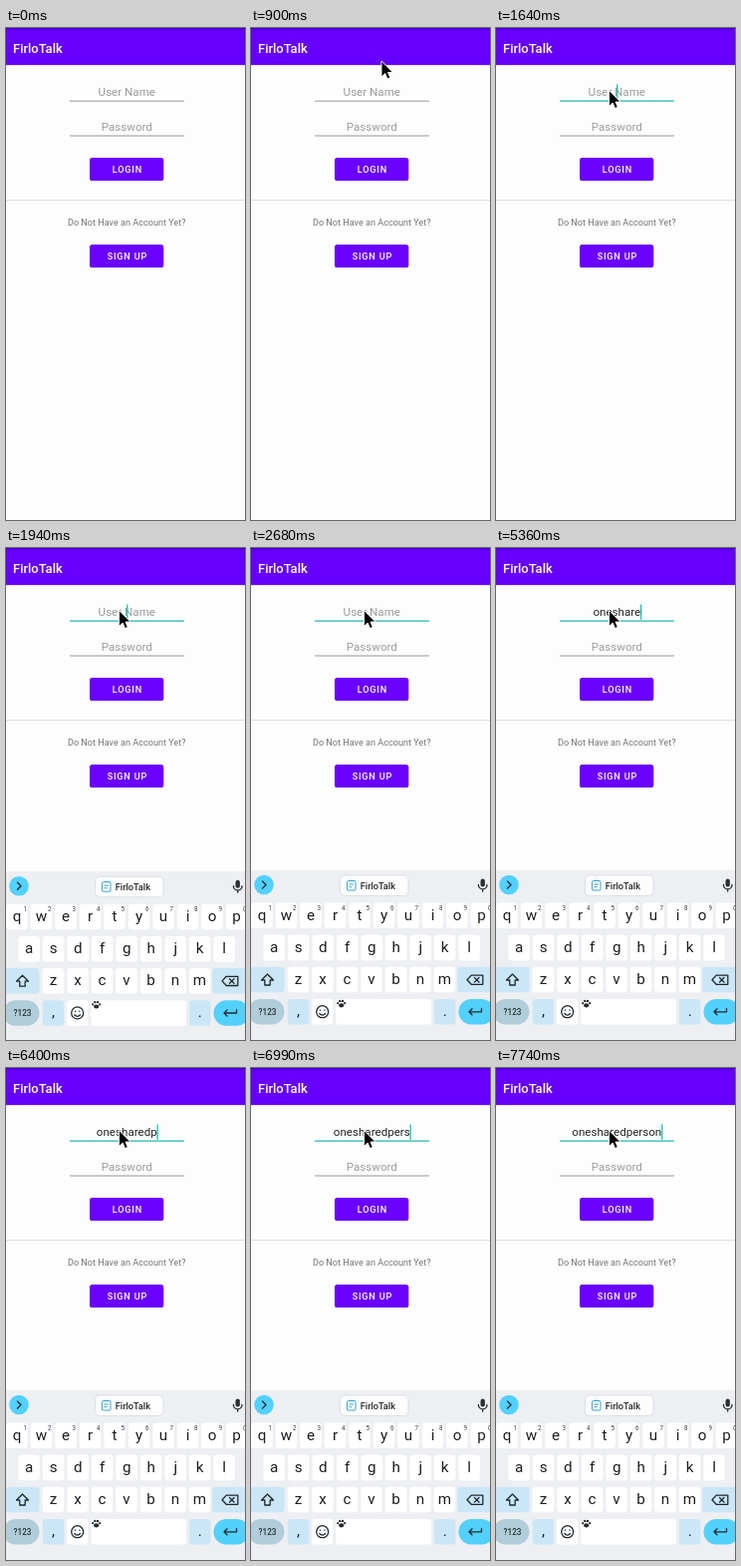
An HTML page for the animation above (8 s loop, 240x493 px).

```html
<!DOCTYPE html>
<html lang="en">
<head>
<meta charset="utf-8">
<title>Login screen</title>
<style>
  html, body { margin: 0; height: 100%; overflow: hidden; background: #fdfdfd; }
  svg { display: block; width: 100vw; height: 100vh; }
  text { font-family: Roboto, sans-serif; }
  .mid { text-anchor: middle; }
  .title { font-size: 13px; font-weight: 500; fill: #fff; }
  .field { font-size: 11.6px; fill: #9b9b9b; }
  .note { font-size: 9.1px; fill: #757575; }
  .button { font-size: 9.1px; font-weight: 500; letter-spacing: .81px; fill: #fff; }
  .chip { font-size: 9.2px; font-weight: 500; fill: #25282b; }
  .key { font-size: 15.2px; fill: #1b1d20; }
  .digit { font-size: 6.3px; fill: #3c4043; }
  .mode { font-size: 8.2px; font-weight: 500; fill: #25323a; }
  .icon { fill: none; stroke: #1f2a30; stroke-width: 1.3; stroke-linecap: round; stroke-linejoin: round; }
</style>
</head>
<body>
<svg viewBox="0 0 240 493" preserveAspectRatio="none">
  <rect width="240" height="493" fill="#fdfdfd"/>
  <rect y="37" width="240" height="1" fill="#000" opacity=".12"/>
  <rect width="240" height="37" fill="#6600fa"/>
  <rect width="240" height="1.5" fill="#4700c8"/>
  <text class="title" x="7" y="24.5">FirloTalk</text>

  <text id="entry" class="field mid" x="121.3" y="68.3"></text>
  <path id="line" d="M64 73.2H179"/>
  <rect id="caret" y="56.5" width="1.3" height="15.3" fill="#14c2b3"/>
  <text class="field mid" x="121.3" y="103.4">Password</text>
  <path d="M64 108H179" stroke="#8c8c8c" stroke-width=".9"/>

  <g fill="#6a00ff">
    <rect x="84" y="130" width="74.3" height="23" rx="2.6"/>
    <rect x="84" y="217" width="74.3" height="23" rx="2.6"/>
  </g>
  <text class="button mid" x="121.9" y="145">LOGIN</text>
  <path d="M0 172.5H240" stroke="#dedede"/>
  <text class="note mid" x="121.2" y="198.2">Do Not Have an Account Yet?</text>
  <text class="button mid" x="121.9" y="232">SIGN UP</text>

  <g id="keyboard">
    <rect y="322.7" width="240" height="172" fill="#edeff3"/>
    <circle cx="13" cy="337.5" r="9.8" fill="#52d1fc"/>
    <path class="icon" d="M11.5 334l3.5 3.5-3.5 3.5"/>
    <rect x="89.5" y="328" width="68.5" height="20.5" rx="4.5" fill="#fdfdfe" stroke="#d6dade" stroke-width=".8"/>
    <g fill="none" stroke="#38a5cf">
      <rect x="96.5" y="333.5" width="8.5" height="9.5" rx="1"/>
      <path d="M98.8 333.2h4M98.5 337h4.5M98.5 339.5h3"/>
    </g>
    <text class="chip" x="109.8" y="341.5">FirloTalk</text>
    <rect x="230.5" y="331.5" width="4.4" height="8" rx="2.2" fill="#2c3033"/>
    <path class="icon" d="M228.4 337.5a4.3 4.3 0 0 0 8.6 0M232.7 342v2"/>
    <g id="keys"></g>
    <g class="icon">
      <path d="M16.5 427l-6 6h3.3v5h5.4v-5h3.3z"/>
      <path d="M217 432.7l4.2-4.6h11.6v9.2h-11.6zM224.5 430.5l4.5 4.5m0-4.5l-4.5 4.5"/>
      <circle cx="71.7" cy="464.7" r="6"/>
      <path d="M69.5 463v.2M73.9 463v.2M68.8 466.5q2.9 3.2 5.8 0"/>
      <path d="M231.5 461.5v3.3h-12.5m3-3l-3 3 3 3"/>
    </g>
    <g fill="#25282b">
      <circle cx="87.2" cy="456.2" r="1.1"/><circle cx="89.3" cy="453.9" r="1.2"/>
      <circle cx="92.1" cy="453.9" r="1.2"/><circle cx="94.2" cy="456.2" r="1.1"/>
      <ellipse cx="90.7" cy="458.3" rx="2.6" ry="2.1"/>
    </g>
  </g>

  <path id="pointer" d="M0 0V16L3.7 12.6 6.1 18 8.8 16.8 6.5 11.5H11.4Z" fill="#000" stroke="#fff" stroke-width=".9"/>
</svg>
<script>
const $ = id => document.getElementById(id);
const NAME = 'onesharedperson', HINT = 'User Name', LOOP = 8000, CENTER = 121.3;

// Keyboard layout
const BLUE = '#cbe6f6';
let html = '';
const box = (x, y, w, fill = '#fff', r = 3.2) =>
  html += `<rect x="${x}" y="${y}" width="${w}" height="25.5" rx="${r}" fill="${fill}"/>`;
const label = (cls, x, y, s) => html += `<text class="${cls} mid" x="${x}" y="${y}">${s}</text>`;
const row = (letters, x0, y, digits) => [...letters].forEach((c, i) => {
  const x = x0 + i * 24.5;
  box(x - 10.7, y, 21.4);
  label('key', x, y + 17.3, c);
  if (digits) label('digit', x + 8.2, y + 7, (i + 1) % 10);
});
row('qwertyuiop', 11, 355.5, true);
row('asdfghjkl', 23.2, 387.7);
row('zxcvbnm', 47.5, 419.8);
box(-1, 419.8, 34.5, BLUE);
box(207.2, 419.8, 36, BLUE);
box(-3, 452, 36.5, '#b0cdd9', 12.7);
label('mode', 16.5, 467.8, '?123');
box(36.8, 452, 21.4, BLUE);
label('key', 47.5, 468.5, ',');
box(61, 452, 21.4);
box(85.3, 452, 95.7);
box(184, 452, 21.4, BLUE);
label('key', 194.7, 468.5, '.');
box(208.5, 452, 36, '#52d1fc', 12.7);
$('keys').innerHTML = html;

// Each step is [start time, ...values]; values hold until the next step
const pointerSteps = [[450, 42, 477], [600, 76, 330], [750, 112, 150], [900, 131, 33], [1050, 113.5, 62.5]];
const slideSteps = [[0, 175], [1790, 58], [1940, 1.2], [2090, .4], [2230, 0]];
const typeSteps = [3130, 3720, 3870, 4020, 4770, 4920, 5070, 5360, 5810, 6400, 6550, 6840, 6990, 7290, 7740];
const caretSteps = [[1500, 1], [2680, 0], [3130, 1], [4470, 0], [4770, 1], [6260, 0], [6400, 1]];
const at = (steps, t) => steps.findLast(s => s[0] <= t);
const set = (id, attrs) => { for (const k in attrs) $(id).setAttribute(k, attrs[k]); };

function draw(t) {
  const typed = NAME.slice(0, typeSteps.filter(s => s <= t).length);
  const entry = $('entry');
  entry.textContent = typed || HINT;
  entry.style.fill = typed ? '#242424' : '';

  const half = typed ? entry.getComputedTextLength() / 2 : 0;
  set('caret', { x: CENTER + half - .2, opacity: at(caretSteps, t)?.[1] ?? 0 });

  const focused = t >= 1350;
  set('line', { stroke: focused ? '#22b9ad' : '#8c8c8c', 'stroke-width': focused ? 1.3 : .9 });

  const [, x, y] = at(pointerSteps, t) ?? [0, -50, -50];
  set('pointer', { transform: `translate(${x} ${y})` });
  set('keyboard', { transform: `translate(0 ${at(slideSteps, t)[1]})` });
}

const start = performance.now();
function tick() {
  draw((performance.now() - start) % LOOP);
  requestAnimationFrame(tick);
}
tick();
</script>
</body>
</html>
```
